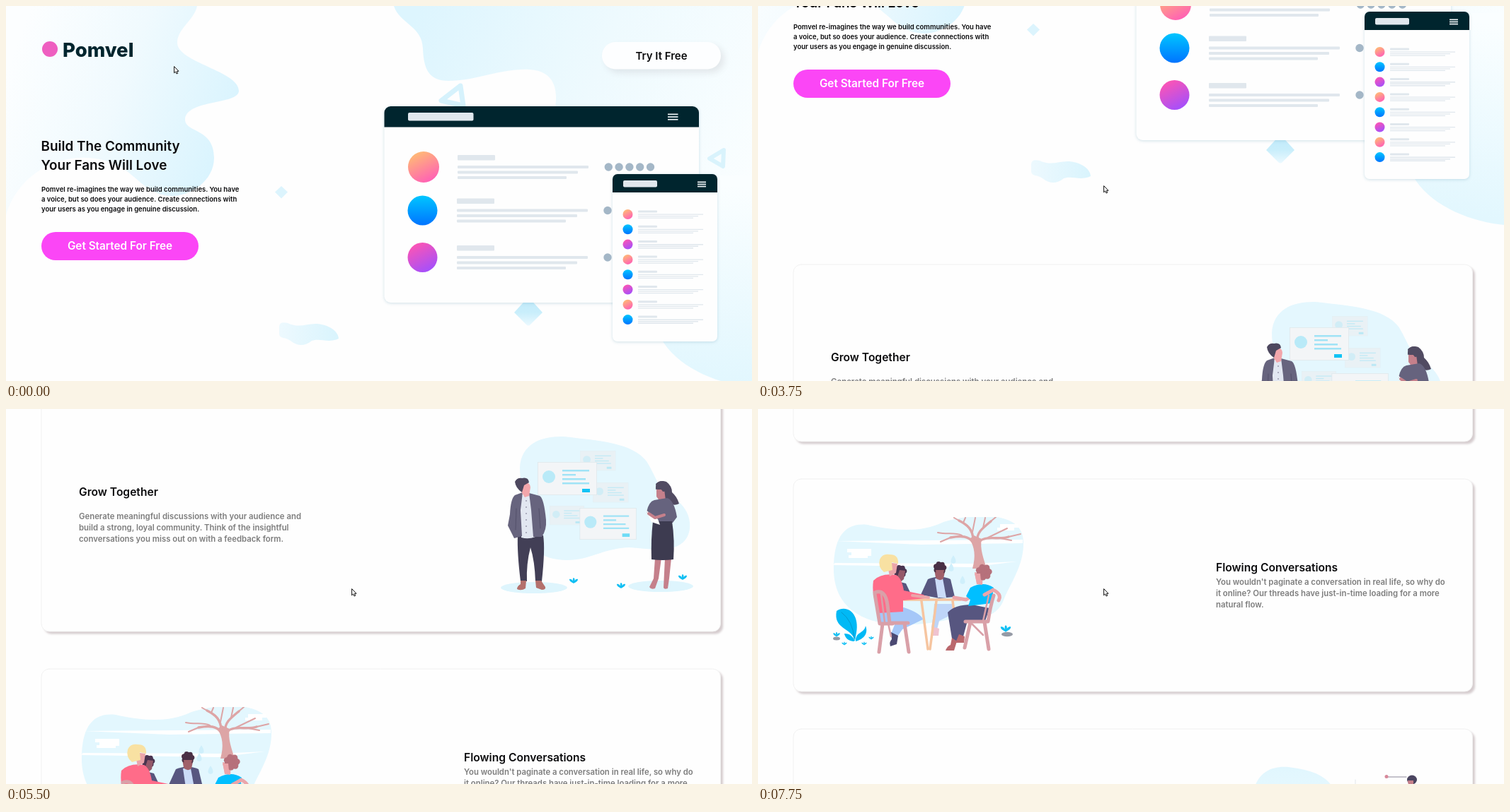
Recreate the animation shown at these times as an HTML page with a canvas. Size 1054 by 531 pixels, loop 8000 ms.

```html
<!DOCTYPE html>
<html lang="en">
<head>
<meta charset="utf-8">
<title>Landing page</title>
<style>
html, body { margin: 0; width: 100%; height: 100%; overflow: hidden; background: #fefefe; }
#stage { position: absolute; left: 0; top: 0; width: 1054px; height: 531px; overflow: hidden; }
#page { position: absolute; left: 0; top: 0; width: 1054px; height: 1420px; font-family: Inter, "Open Sans", sans-serif; font-weight: 600; color: #0b0b0d; }
#page canvas { position: absolute; left: 0; top: 0; }
#page div { position: absolute; white-space: nowrap; }
#arrow { position: absolute; left: 0; top: 0; }
.brand { left: 80px; top: 46px; font-size: 27.5px; line-height: 32px; font-weight: 800; color: #00252e; }
.try { left: 842px; top: 61px; width: 168px; text-align: center; font-size: 15px; line-height: 20px; }
.head { left: 49.5px; top: 184.5px; font-size: 18.9px; line-height: 27px; }
.intro { left: 50px; top: 253px; font-size: 9.5px; line-height: 14px; }
.start { left: 50px; top: 330px; width: 222px; text-align: center; font-size: 15.3px; line-height: 20px; color: #fff; }
.title { font-size: 15.6px; line-height: 20px; }
.copy { font-size: 11.35px; line-height: 16.2px; color: #7d7d7d; }
.a { left: 103px; }
.b { left: 647px; }
</style>
</head>
<body>
<div id="stage">
  <div id="page">
    <canvas id="art" width="1054" height="1420"></canvas>
    <div class="brand">Pomvel</div>
    <div class="try">Try It Free</div>
    <div class="head">Build The Community<br>Your Fans Will Love</div>
    <div class="intro">Pomvel re-imagines the way we build communities. You have<br>a voice, but so does your audience. Create connections with<br>your users as you engage in genuine discussion.</div>
    <div class="start">Get Started For Free</div>
    <div class="title a" style="top:718px">Grow Together</div>
    <div class="copy a" style="top:754px">Generate meaningful discussions with your audience and<br>build a strong, loyal community. Think of the insightful<br>conversations you miss out on with a feedback form.</div>
    <div class="title b" style="top:1094px">Flowing Conversations</div>
    <div class="copy b" style="top:1115.5px">You wouldn't paginate a conversation in real life, so why do<br>it online? Our threads have just-in-time loading for a more<br>natural flow.</div>
  </div>
  <svg id="arrow" width="9" height="13"><path d="M.6.6V9.8L2.7 7.9 4 11 5.7 10.3 4.4 7.3H7Z" fill="#fff" stroke="#111" stroke-width="1"/></svg>
</div>
<script>
const g = document.getElementById('art').getContext('2d');

function fill(color, d) { g.fillStyle = color; g.fill(new Path2D(d)); }
function stroke(color, w, d) {
  g.strokeStyle = color; g.lineWidth = w; g.lineCap = g.lineJoin = 'round';
  g.stroke(new Path2D(d));
}
function oval(color, x, y, rx, ry = rx) {
  g.fillStyle = color; g.beginPath(); g.ellipse(x, y, rx, ry, 0, 0, 7); g.fill();
}
function box(color, x, y, w, h, r = 0) {
  g.fillStyle = color; g.beginPath(); g.roundRect(x, y, w, h, r); g.fill();
}
function blend(x0, y0, x1, y1, ...colors) {
  const b = g.createLinearGradient(x0, y0, x1, y1);
  colors.forEach((c, i) => b.addColorStop(i / (colors.length - 1), c));
  return b;
}
function shadow(color, dx, dy, blur, draw) {
  g.save();
  g.shadowColor = color; g.shadowOffsetX = dx; g.shadowOffsetY = dy; g.shadowBlur = blur;
  draw();
  g.restore();
}
function at(y, draw) { g.save(); g.translate(0, y); draw(); g.restore(); }

const INK = '#00252e', BAR = '#e0e7ed';
const AVATARS = [['#ffbd73', '#ff5cb8'], ['#00c6ff', '#0074ff'], ['#ff55b2', '#a04fff']];

function avatar(x, y, r, i) {
  const tilt = i % 3 === 1 ? 0 : r * .5;
  oval(blend(x - tilt, y - r, x + tilt, y + r, ...AVATARS[i % 3]), x, y, r);
}
function menu(x, y, w, gap) {
  for (let i = 0; i < 3; i++) box('#eef2f5', x, y + i * gap, w, 1.7);
}
function panel(x, y, w, h, r, bar) {
  shadow('rgba(120,170,190,.35)', 0, 1, 4, () => box('#fefefe', x, y, w, h, r));
  box(INK, x, y, w, bar, [r, r, 0, 0]);
}

function backdrop() {
  fill(blend(20, 40, 320, 150, '#fcfeff', '#f0fafe', '#daf4fe'),
    'M0 0H270C266 20 242 32 242 52C242 80 329 92 329 120C329 140 256 132 253 160C252 180 294 172 294 215C294 248 260 269 235 269C195 268 185 236 150 222C90 200 20 230 0 296Z');
  const tide = blend(560, 60, 1054, 260, '#ddf5fe', '#eefafe', '#fafeff');
  fill(tide, 'M548 0C556 25 588 28 589 60C590 90 598 106 625 106C665 106 700 88 740 90C775 92 780 118 776 145L800 300H1054V0Z');
  fill(blend(1000, 250, 960, 520, '#fafeff', '#e2f7fe'),
    'M800 300C870 400 915 450 930 478C955 515 1010 536 1054 540V240H800Z');
  stroke('#d6f2fc', 7, 'M642 113L615 134L646 141Z');
  stroke('#d9f3fc', 6, 'M1014 204L994 216L1013 227Z');
  fill('#dcf4fd', 'M389 255L398 263.5L389 272.5L380 263.5Z');
  fill(blend(0, 414, 0, 454, '#bfeafb', '#c9eefb', '#eefaff'), 'M738 412L758 434L741 451Q738 454 735 451L718 434Z');
  fill(blend(386, 0, 470, 0, '#edf9fe', '#d9f4fd'),
    'M386 458C385 446 392 448 398 449C415 457 425 449 440 450C460 452 470 463 470 471C455 478 445 470 432 474C422 482 412 482 402 474C393 468 388 472 386 465Z');
}

function hero() {
  backdrop();
  oval('#ee5fc0', 62, 61, 11);
  shadow('rgba(90,80,90,.12)', 5, 5, 10, () => box('#fdfeff', 842, 51, 168, 38.5, 19));
  box('#fb46f6', 50, 320, 222, 40, 20);

  panel(534.5, 142, 444.5, 278, 9, 29.5);
  box(BAR, 568, 151, 92.5, 11.5, 2);
  menu(935, 152.5, 14.5, 3.7);
  [[228, 22, 590, 638], [289.5, 21, 588.5, 637], [356, 21, 588.5, 637]].forEach(([y, r, cx, x], i) => {
    avatar(cx, y, r, i);
    box(BAR, x, y - 17, 53, 7.5, 1);
    [185, 170, 154].forEach((w, k) => box(BAR, x, y - 2 + k * 7.5, w, 4, 1));
    for (let k = 0; k < (i ? 1 : 5); k++) oval('#a4b7c7', (i ? 850 : 851.3) + k * 14.8, y, 5.7);
  });

  panel(857, 238, 148, 237, 7, 26);
  box(BAR, 872, 247, 48, 9.5, 2);
  menu(977, 248.5, 12, 3.1);
  for (let i = 0; i < 8; i++) {
    const y = 295 + i * 21.3;
    avatar(878.5, y, 7, i);
    box(BAR, 893, y - 5.5, 27, 3, 1);
    [92, 85, 78].forEach((w, k) => box(BAR, 893, y - .5 + k * 2.5, w, 1.3));
  }
}

function card(y, h) {
  shadow('rgba(208,198,201,.9)', 3.5, 3.5, 3, () => box('#fefefe', 50, y, 959.5, h, 11));
  g.strokeStyle = '#f1f1f1'; g.lineWidth = 1;
  g.beginPath(); g.roundRect(50, y, 959.5, h, 11); g.stroke();
}

// Small white note: picture dot, text lines and a button
function note(x, y, s, alpha, button) {
  g.save();
  g.translate(x, y); g.scale(s, s); g.globalAlpha = alpha;
  box('#dce6ea', 0, 0, 84, 47);
  box('#f3f5f7', .7, .7, 82.6, 45.6);
  oval('#b9eaf8', 16, 21, 9);
  [38, 19, 33, 38].forEach((w, i) => box('#a0e3f6', 35, 11 + i * 6, w, 2.4));
  box(button, 63, 38, 11, 5);
  g.restore();
}

function sprig(x, y, s = 1) {
  g.save();
  g.translate(x, y); g.scale(s, s);
  fill('#10bff3', 'M0 4C-3 2 -6 1 -6 -2C-3 -3 -1 0 0 3C-2 -1 -1 -4 0 -4C2 -3 2 0 0 3C1 -1 4 -3 6 -2C6 1 3 2 0 4Z');
  g.restore();
}

function together() {
  fill('#e4f7fe', 'M726 190C728 155 758 145 788 146C840 152 885 155 905 181C920 205 922 224 946 235C970 252 970 280 960 292C945 312 910 305 880 303C840 305 825 322 790 321C755 319 740 306 744 280C748 250 726 230 726 190Z');
  note(811, 166, .6, .5, '#8ee0f5');
  note(829, 211, .6, .5, '#8ee0f5');
  note(768, 244, .58, .5, '#8ee0f5');
  note(751, 182, 1, 1, '#12c3f5');
  note(810.5, 247, .955, 1, '#6fdcf6');

  oval('#def5fd', 746, 360, 47, 8);
  fill('#423f56', 'M723 286H759Q762 305 757 351H748Q747 322 741 303Q735 326 736 351H727Q722 310 723 286Z');
  fill('#b4706c', 'M727 350H735L734 361Q728 365 722 362Q722 358 727 355ZM748 350H756L762 359Q763 363 757 363L749 360Z');
  fill('#e2e7f1', 'M727 230L740 228L748 288Q738 292 728 289Z');
  fill('#67647e', 'M730 225L719 229Q713 234 712 256L709 272L718 290L729 287L727 250ZM739 226L754 230Q760 233 763 264Q764 278 757 288L745 288L742 250Z');
  stroke('#54516b', 1, 'M721 248L720 278M753 248L755 276');
  for (let y = 237; y < 286; y += 9) oval('#67647e', 735, y, .8);
  fill('#f2a6ab', 'M728 213Q740 208 741 218L739 230L733 232L729 226Z');
  fill('#4d485f', 'M719 210Q722 204 729 205Q738 203 739 211L732 215L729 225Q720 219 719 210Z');

  oval('#def5fd', 925, 358, 46, 8);
  fill('#c5808b', 'M917 318H926L922 347L917 361Q911 363 909 359L915 347ZM931 318H940L937 347L935 361Q930 363 929 360Z');
  fill('#514b62', 'M918 213Q924 207 933 210Q941 216 941 225Q948 231 951 241Q944 245 936 240Q926 238 921 229Z');
  fill('#c5808b', 'M919 221L930 221L932 236L924 238L919 231Z');
  fill('#514b62', 'M918 221Q917 208 929 209L936 223L928 224Q925 218 918 221Z');
  fill('#66637e', 'M916 236L934 233Q944 236 948 260L942 268H914L912 258L905 253Q908 238 916 236Z');
  fill('#3d3b50', 'M914 266H941Q945 292 943 320Q928 322 912 320Q911 292 914 266Z');
  fill('#fff', 'M904 250L921 263L924 271L912 267Z');
  stroke('#c5808b', 4, 'M908 255L917 261L930 257');
  sprig(802, 350); sprig(869, 357); sprig(956, 345);
}

function tree() {
  const bark = '#dda5a6';
  fill(bark, 'M303 226C308 208 306 196 299 184L305 179L316 184C313 198 319 212 323 226Z');
  stroke(bark, 3.4, 'M304 189C298 180 288 179 272 182M304 186C304 171 296 164 284 158M310 186C309 175 317 169 329 159M312 188C323 178 340 186 354 181');
  stroke(bark, 2, 'M288 179C278 174 268 178 254 175M272 182L258 188M296 165L277 154M303 174L307 154M318 168L321 154M329 159L336 153M325 182L352 169M354 181L371 177M342 183L358 186M290 161L293 154');
}

function curls(color, x, y, r) {
  oval(color, x, y, r);
  for (let i = 0; i < 7; i++) oval(color, x + r * .75 * Math.cos(i * .9 + 2.6), y + r * .75 * Math.sin(i * .9 + 2.6), r * .42);
}

function chair(d, rails) {
  stroke('#d9a0a8', 5, d);
  stroke('#d9a0a8', 2.5, rails);
}

function table() {
  fill('#e3f7fe', 'M107 222C108 185 120 160 155 164C190 172 230 176 262 160C300 148 375 142 375 188C376 220 358 245 348 268C338 300 300 300 270 298C230 308 170 310 140 290C115 275 106 250 107 222Z');
  fill('#fff', 'M111 187L374 185L374 190L230 192ZM108 218L300 219L366 216L300 224L107 221ZM126 198H160V208H155V211H128V207H132V203H126ZM342 163H368V168H362V172H338V168H342Z');
  tree();
  for (const [x, y] of [[276, 214], [289, 243], [273, 225]])
    fill('#cfeffb', `M${x} ${y - 7}Q${x + 7} ${y + 4} ${x} ${y + 5}Q${x - 7} ${y + 4} ${x} ${y - 7}Z`);

  curls('#4a3450', 201, 230, 8);
  fill('#94596a', 'M200 228L208 229L206 241L200 246L196 240Z');
  fill('#57557d', 'M197 244L209 247L216 262L202 264Z');

  fill('#bed5f8', 'M249 276H274L276 290L256 300L253 312L245 310L248 290Z');
  fill('#f0c3d0', 'M246 308L256 311L255 321H246Z');
  fill('#585780', 'M240 241Q257 234 272 241L278 266L256 268L230 263Z');
  fill('#cbdcf8', 'M250 240H261L266 267H254Z');
  fill('#a0606a', 'M249 226H265L262 240Q256 245 251 239Z');
  curls('#4a3045', 257, 225, 8);
  fill('#a0606a', 'M251 228H263L261 238Q256 241 252 236Z');

  stroke('#f6c5a0', 3.5, 'M206 270H286M231 272L240 340M252 272L243 340M275 272L281 316');

  fill('#a5c7f8', 'M172 286L206 281Q230 289 233 298L204 312L197 322L188 318L194 303L172 306Z');
  fill('#4b4972', 'M188 316L198 321L196 333L187 336Q185 330 189 326Z');
  fill('#ff6c89', 'M163 243Q174 232 195 235Q203 239 206 257L234 263L238 268L205 271L205 287L170 289Q160 262 163 243Z');
  stroke('#eba5aa', 4, 'M218 264L241 267');
  fill('#eba5aa', 'M182 217L197 219L195 232L186 237Z');
  fill('#f8e1a2', 'M172 213Q176 204 186 206Q199 206 198 219L189 217L190 228L178 231Q169 224 172 213Z');
  chair('M165 260Q180 254 183 278L186 303H212M165 262L172 304H190M176 304L171 344M207 304L213 344', 'M174 262L179 302M184 304L188 322');

  fill('#575680', 'M268 288Q278 277 302 277L327 282L321 300L296 300L290 322L281 329L274 325Z');
  fill('#ba686d', 'M274 324L281 329L277 342H265Q267 336 272 334ZM284 319L292 322L291 331H279Z');
  stroke('#eba5aa', 5, 'M303 264L294 270L277 267');
  fill('#00bfff', 'M300 253Q318 243 333 253L330 275L297 279L300 270L294 265Z');
  stroke('#eba5aa', 5, 'M332 256Q345 262 340 271M320 263L331 257');
  fill('#eba5aa', 'M306 231L318 233L317 249L309 248Z');
  curls('#b6717b', 319, 231, 10);
  fill('#eba5aa', 'M306 233L314 233L315 244L309 246Z');
  chair('M333 264Q328 280 325 301H293M300 302L292 338M320 302L326 340', 'M326 264Q322 282 318 300M302 304L318 320');

  fill('#00b9f5', 'M137 328C132 309 106 312 111 286C126 276 146 290 138 322ZM138 327C139 315 150 318 152 307C157 320 146 327 138 329ZM135 329C127 328 123 324 122 318C131 318 134 323 137 328Z');
  stroke('#0799cc', 1, 'M118 288Q134 300 136 325');
  sprig(122, 332, .6); sprig(150, 332, .6); sprig(160, 324, .6);
  oval('#959aa5', 111, 325, 5, 2.5); sprig(111, 319, .8);
  oval('#959aa5', 352, 319, 8, 3.2); sprig(350, 311, 1.2);
}

function peek() {
  fill(blend(0, 505, 0, 541, '#e0f6fe', '#e6f8fe'), 'M700 541C708 508 735 504 756 508C785 512 805 520 815 541Z');
  stroke('#e3e6ea', 1, 'M844 525V541');
  stroke('#8b8799', 1, 'M890 521H916');
  oval('#d7889a', 888, 520.5, 2.5);
  oval('#4b4560', 924, 525, 7, 6.5);
  fill('#c5808b', 'M918 526H926V541H920Z');
}

hero();
card(596, 329);
card(978, 301);
card(1332, 320);
at(503, together);
at(879, () => {
  g.save();
  g.beginPath(); g.rect(90, 153, 320, 210); g.clip();
  table();
  g.restore();
  peek();
});

// Keyframes [ms, value...]: the picture advances in held ticks
const TICK = 250, LOOP = 8000;
const POINTER = [[0, 237, 85], [250, 180, 72], [500, 90, 65], [750, 225, 74], [1000, 400, 110], [1250, 492, 174],
  [1500, 230, 260], [1750, 120, 440], [2000, 302, 385], [2250, 430, 300], [2500, 490, 256], [2750, 490, 254],
  [3250, 490, 254], [3500, 488, 254]];
const SCROLL = [[0, 0], [2750, 0], [3000, 5], [3250, 27], [3500, 125], [3750, 230], [4000, 305], [4250, 400], [4500, 470],
  [4750, 503], [5000, 503], [5250, 560], [5500, 610], [6250, 610], [6500, 647], [6750, 715], [7000, 770],
  [7250, 770], [7500, 820], [7750, 879]];

function sample(keys, t, k = 1) {
  const i = keys.findIndex(p => p[0] > t);
  if (i < 0) return keys[keys.length - 1][k];
  const a = keys[i - 1], b = keys[i];
  return a[k] + (b[k] - a[k]) * (t - a[0]) / (b[0] - a[0]);
}

const page = document.getElementById('page'), arrow = document.getElementById('arrow');
const begin = performance.now();
function frame() {
  const t = Math.floor((performance.now() - begin) % LOOP / TICK) * TICK;
  page.style.transform = `translateY(${-Math.round(sample(SCROLL, t))}px)`;
  arrow.style.transform = `translate(${sample(POINTER, t)}px, ${sample(POINTER, t, 2)}px)`;
  requestAnimationFrame(frame);
}
frame();
</script>
</body>
</html>
```
